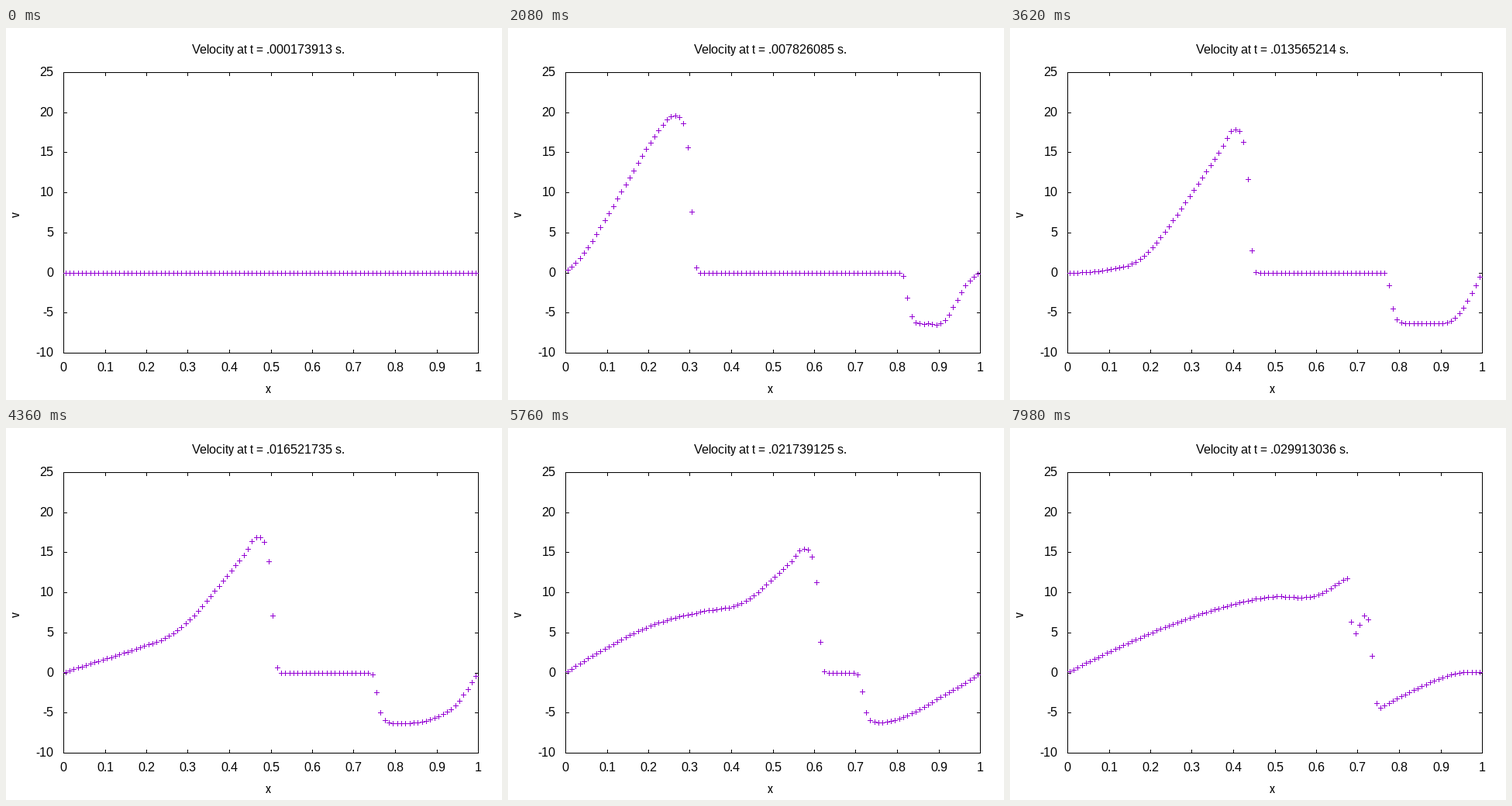
A matplotlib script that plays this animation: 640x480 px, repeating every 8 s.

```python
import numpy as np
import matplotlib.pyplot as plt
from matplotlib.animation import FuncAnimation

plt.rcParams["font.family"] = "Liberation Sans"
plt.rcParams["text.hinting"] = "native"
plt.rcParams["text.hinting_factor"] = 1
plt.rcParams["path.simplify"] = False

DPI, W, H = 80, 640, 480
PX = 72 / DPI                       # one pixel in points
X0, X1, Y0, Y1 = 74, 609, 419, 57   # plot box in pixels

STEP = 0.000173913                  # simulated seconds per picture
PICTURES, SUBSTEPS = 172, 4
N, GAMMA, HOT = 100, 1.4, 11        # cells, gas constant, cells per hot end
CELLS = (np.arange(N) + 0.5) / N


# Two blast waves between walls: 1D Euler equations, MUSCL with HLLC fluxes.
# Gas states are arrays of (density, velocity, pressure) rows.

def conserved(w):
    r, u, p = w
    return np.array([r, r * u, p / (GAMMA - 1) + r * u * u / 2])


def primitive(q):
    r = np.maximum(q[0], 1e-6)
    u = q[1] / r
    p = (GAMMA - 1) * (q[2] - r * u * u / 2)
    return np.array([r, u, np.maximum(p, 1e-6)])


def side_flux(w, s, sm):
    """Flux of one side, and of the star region next to it."""
    r, u, p = w
    q = conserved(w)
    f = q * u + np.array([0 * p, p, p * u])
    energy = q[2] / r + (sm - u) * (sm + p / (r * (s - u)))
    star = r * (s - u) / (s - sm) * np.array([np.ones_like(sm), sm, energy])
    return f, f + s * (star - q)


def hllc(wl, wr):
    (rl, ul, pl), (rr, ur, pr) = wl, wr
    cl, cr = np.sqrt(GAMMA * pl / rl), np.sqrt(GAMMA * pr / rr)
    sl, sr = np.minimum(ul - cl, ur - cr), np.maximum(ul + cl, ur + cr)
    ml, mr = rl * (sl - ul), rr * (sr - ur)
    sm = (pr - pl + ul * ml - ur * mr) / (ml - mr)
    fl, fl_star = side_flux(wl, sl, sm)
    fr, fr_star = side_flux(wr, sr, sm)
    return np.where(sl >= 0, fl, np.where(sm >= 0, fl_star,
                                          np.where(sr > 0, fr_star, fr)))


def rate(q):
    w = primitive(q)
    mirror = np.array([[1], [-1], [1]])
    w = np.hstack([w[:, 1::-1] * mirror, w, w[:, :-3:-1] * mirror])
    d = np.diff(w)
    a, b = d[:, :-1], d[:, 1:]
    half = (np.sign(a) + np.sign(b)) * np.minimum(abs(a), abs(b)) / 4
    mid = w[:, 1:-1]
    f = hllc((mid + half)[:, :-1], (mid - half)[:, 1:])
    return -np.diff(f) * N


def simulate():
    p = np.full(N, 0.01)
    p[:HOT], p[-HOT:] = 1000, 100
    q = conserved(np.array([np.ones(N), np.zeros(N), p]))
    dt = STEP / SUBSTEPS
    out = []
    for _ in range(PICTURES):
        out.append(primitive(q)[1])
        for _ in range(SUBSTEPS):
            trial = q + dt * rate(q)
            q = (q + trial + dt * rate(trial)) / 2
    return out


def to_x(x):
    return np.rint(X0 + (X1 - X0) * x)


def to_y(v):
    return np.rint(Y0 + (Y1 - Y0) * (v + 10) / 35)


def segments(segs):
    """Join (xa, ya, xb, yb) pieces into one broken line."""
    s = np.asarray(segs, float)
    gap = np.full(len(s), np.nan)
    return (np.c_[s[:, 0], s[:, 2], gap].ravel(),
            np.c_[s[:, 1], s[:, 3], gap].ravel())


def crosses(v):
    x, y = to_x(CELLS), to_y(v)
    return segments(np.r_[np.c_[x - 3, y, x + 3, y], np.c_[x, y - 3, x, y + 3]])


fig = plt.figure(figsize=(W / DPI, H / DPI), dpi=DPI, facecolor="white")
ax = fig.add_axes([0, 0, 1, 1])
ax.set_xlim(0, W)
ax.set_ylim(H, 0)
ax.axis("off")

pen = dict(lw=PX, snap=True, solid_capstyle="projecting")
font = dict(fontsize=16 * PX, color="black")

box = [(X0, Y0, X1, Y0), (X0, Y1, X1, Y1), (X0, Y0, X0, Y1), (X1, Y0, X1, Y1)]
for n in range(11):
    x = to_x(n / 10)
    box += [(x, Y0, x, Y0 - 4), (x, Y1, x, Y1 + 4)]
    ax.text(x, 443, f"{n / 10:g}", ha="center", **font)
for v in range(-10, 26, 5):
    y = to_y(v)
    box += [(X0, y, X0 + 4, y), (X1, y, X1 - 4, y)]
    ax.text(61.5, y + 5, str(v), ha="right", **font)
ax.text(338.5, 471, "x", ha="center", **font)
ax.text(13.5, 240, "v", ha="center", va="center", rotation=90, **font)
title = ax.text(339, 33, "", ha="center", **font)

ax.plot(*segments(box), color="black", zorder=2, **pen)
points, = ax.plot([], [], color="#9400d3", zorder=3, **pen)

velocity = simulate()


def draw(tick):
    # pictures stay for 1, 5 and 1 ticks in turn
    q, r = divmod(tick, 7)
    i = 3 * q + (r > 0) + (r > 5)
    label = f"{(i + 1) * STEP:.9f}".lstrip("0")
    title.set_text(f"Velocity at t = {label} s.")
    points.set_data(*crosses(velocity[i]))
    return title, points


def start():
    return draw(0)


anim = FuncAnimation(fig, draw, frames=400, interval=20, init_func=start,
                     repeat=True, repeat_delay=0, cache_frame_data=False)
plt.show()
```
